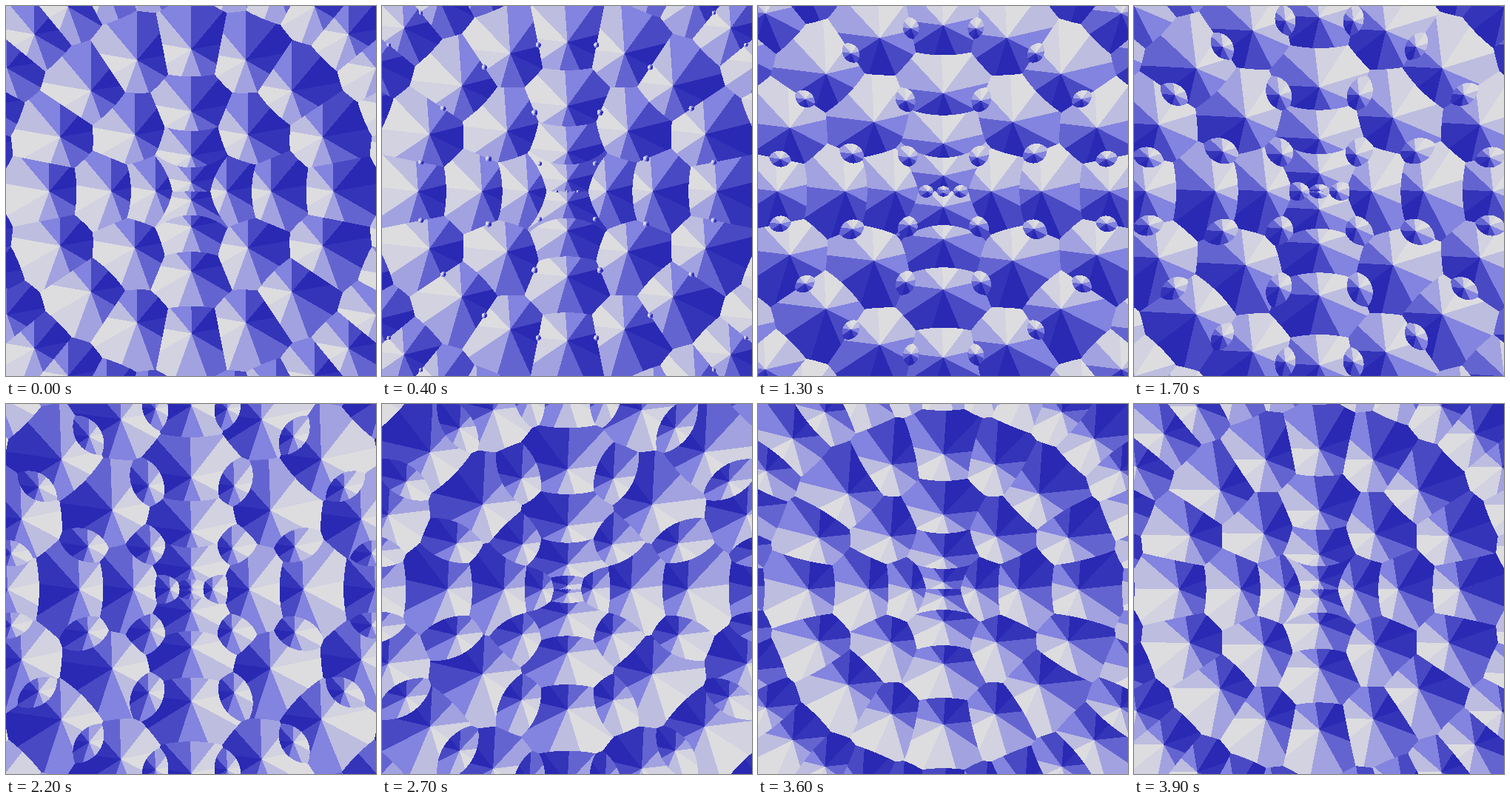
An HTML page with a canvas that plays this animation: 500x500 px, repeating every 4 s.

```html
<!DOCTYPE html>
<html lang="en">
<head>
<meta charset="utf-8">
<title>Cone rings</title>
<style>
html, body { margin: 0; width: 100%; height: 100%; overflow: hidden; }
canvas { display: block; }
</style>
</head>
<body>
<canvas id="stage" width="500" height="500"></canvas>
<script>
const SIZE = 500, MID = SIZE / 2, REACH = 110;
const STEPS = 40, STEP_MS = 100, RINGS = 7, SIDES = 9;
const SHRINK = 0.785; // cone width ratio from one ring to the next
const TAU = Math.PI * 2, SECTOR = TAU / SIDES;

const ctx = document.getElementById('stage').getContext('2d');
const image = ctx.createImageData(SIZE, SIZE);
const pixels = new Uint32Array(image.data.buffer);
const depth = new Float32Array(SIZE * SIZE);
const owner = new Uint16Array(SIZE * SIZE);

// Facet shades run from deep blue through periwinkle to near white.
const shades = Array.from({ length: SIDES }, (_, k) => {
  const light = Math.cos(((k + 0.5) * 40 - 250) * Math.PI / 180);
  const red = Math.round(131 + 91 * light);
  const blue = Math.round(224 + Math.min(0, light) * 45);
  return (255 << 24 | blue << 16 | red << 8 | red) >>> 0;
});

// Each ring holds twice as many cones as the one inside it; the added ones widen from nothing.
function conesAt(u) {
  const cones = [];
  for (let ring = 0; ring < RINGS; ring++) {
    const m = ring + u, radius = 12 * m * m, count = 2 << ring;
    for (let j = 0; j < count; j++) {
      const isNew = ring === 0 || j % 2 === 1;
      const width = SHRINK ** m * (isNew ? u : 1);
      const angle = j * TAU / count;
      const x = MID + radius * Math.sin(angle);
      const y = MID - radius * Math.cos(angle);
      const near = Math.max(Math.abs(x - MID), Math.abs(y - MID)) < MID + REACH;
      if (width > 0 && near) cones.push({ x, y, slope: 1 / (width * width) });
    }
  }
  return cones;
}

function draw(u) {
  const cones = conesAt(u);
  depth.fill(Infinity);
  cones.forEach(({ x, y, slope }, id) => {
    const x0 = Math.max(0, Math.floor(x - REACH)), x1 = Math.min(SIZE, Math.ceil(x + REACH));
    const y0 = Math.max(0, Math.floor(y - REACH)), y1 = Math.min(SIZE, Math.ceil(y + REACH));
    for (let py = y0; py < y1; py++) {
      const dy = py - y;
      for (let px = x0, i = py * SIZE + x0; px < x1; px++, i++) {
        const dx = px - x;
        const d = (dx * dx + dy * dy) * slope;
        if (d < depth[i]) { depth[i] = d; owner[i] = id; }
      }
    }
  });

  const turn = u * TAU;
  for (let py = 0, i = 0; py < SIZE; py++) {
    for (let px = 0; px < SIZE; px++, i++) {
      const cone = cones[owner[i]];
      const angle = Math.atan2(px - cone.x, cone.y - py) - turn + 2 * TAU;
      pixels[i] = shades[Math.floor(angle / SECTOR) % SIDES];
    }
  }
  ctx.putImageData(image, 0, 0);
}

let shown = -1;
function tick() {
  const step = Math.floor(performance.now() / STEP_MS) % STEPS;
  if (step !== shown) draw((shown = step) / STEPS);
  requestAnimationFrame(tick);
}
tick();
</script>
</body>
</html>
```
